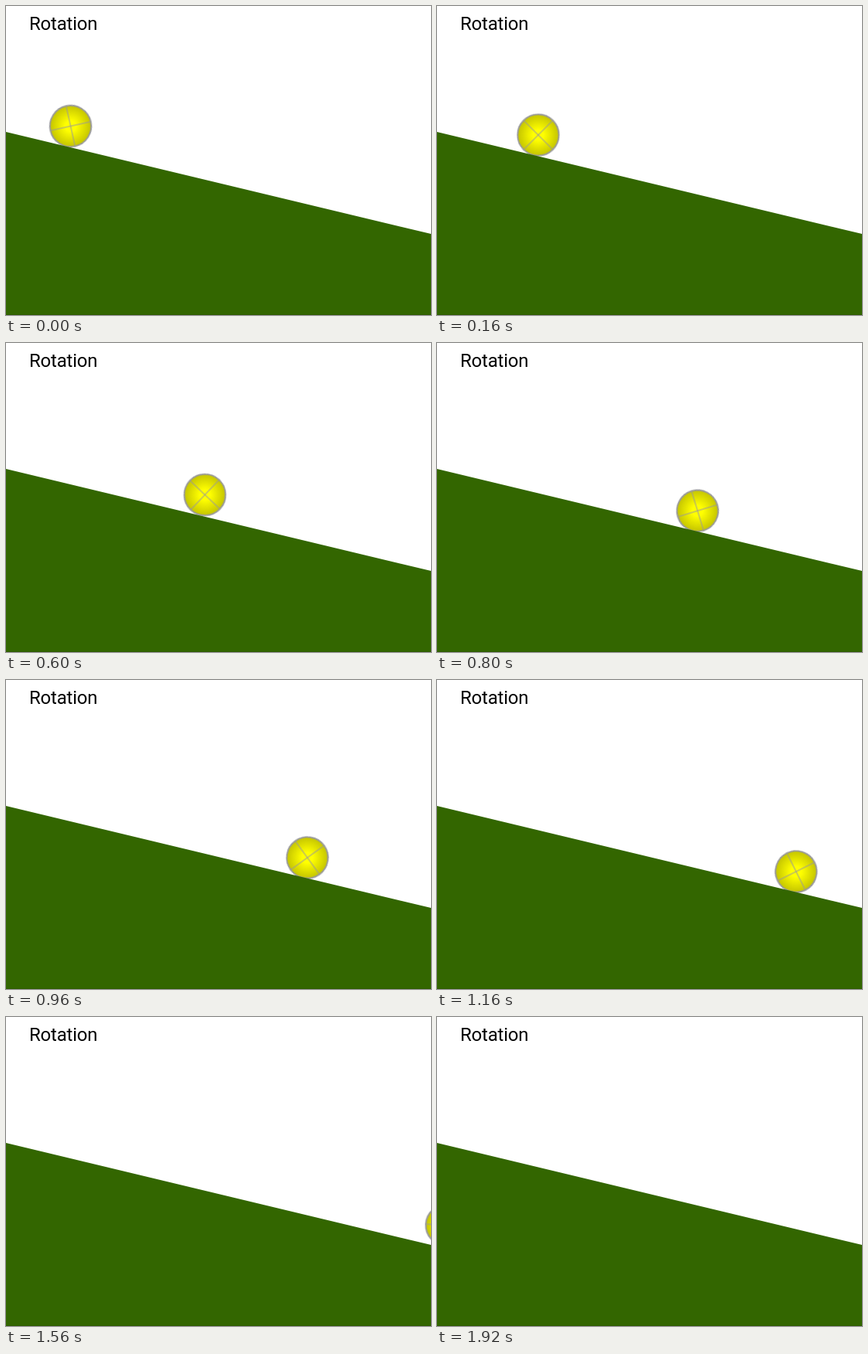
An HTML page for the animation above (2000 ms loop, 550 by 400 pixels).

```html
<!DOCTYPE html>
<html lang="en">
<head>
<meta charset="utf-8">
<title>Rotation</title>
<style>
  html, body {
    margin: 0;
    width: 100%;
    height: 100%;
    overflow: hidden;
    background: #fff;
  }
  svg { display: block; }
  text {
    font: 24px Roboto, sans-serif;
    letter-spacing: -0.2px;
  }
  .ball {
    stroke: #999;
    animation: roll 2s step-end infinite;
  }
  /* The ball moves in uneven hard steps. */
  @keyframes roll {
    0%   { transform: translate(83.6px, 155.5px) rotate(-12.5deg); }
    8%   { transform: translate(131px, 167px) rotate(45deg); }
    12%  { transform: translate(155px, 172.5px) rotate(74deg); }
    18%  { transform: translate(191px, 181px) rotate(118deg); }
    22%  { transform: translate(212px, 185.8px) rotate(149deg); }
    30%  { transform: translate(257.4px, 196.5px) rotate(223.5deg); }
    34%  { transform: translate(289px, 205px) rotate(271deg); }
    40%  { transform: translate(337.2px, 217.2px) rotate(343deg); }
    48%  { transform: translate(390px, 230px) rotate(414deg); }
    58%  { transform: translate(464.7px, 248px) rotate(513.5deg); }
    62%  { transform: translate(501px, 256px) rotate(555deg); }
    68%  { transform: translate(555.7px, 267.7px) rotate(616.5deg); }
    78%  { transform: translate(570px, 269.5px) rotate(633deg); }
    96%, 100% { transform: translate(610px, 279px) rotate(680deg); }
  }
</style>
</head>
<body>
<svg width="550" height="400" viewBox="0 0 550 400">
  <defs>
    <radialGradient id="shine">
      <stop offset="0" stop-color="#ff0"/>
      <stop offset=".25" stop-color="#ff0"/>
      <stop offset="1" stop-color="#c4c400"/>
    </radialGradient>
  </defs>
  <text x="30" y="31">Rotation</text>
  <g class="ball">
    <circle r="26.7" fill="url(#shine)" stroke-width="2"/>
    <path d="M-26.5 0H26.5M0-26.5V26.5"/>
  </g>
  <path d="M0 163L550 295V400H0Z" fill="#360"/>
  <path d="M0 399.5H550" stroke="#2d5a00"/>
</svg>
</body>
</html>
```
